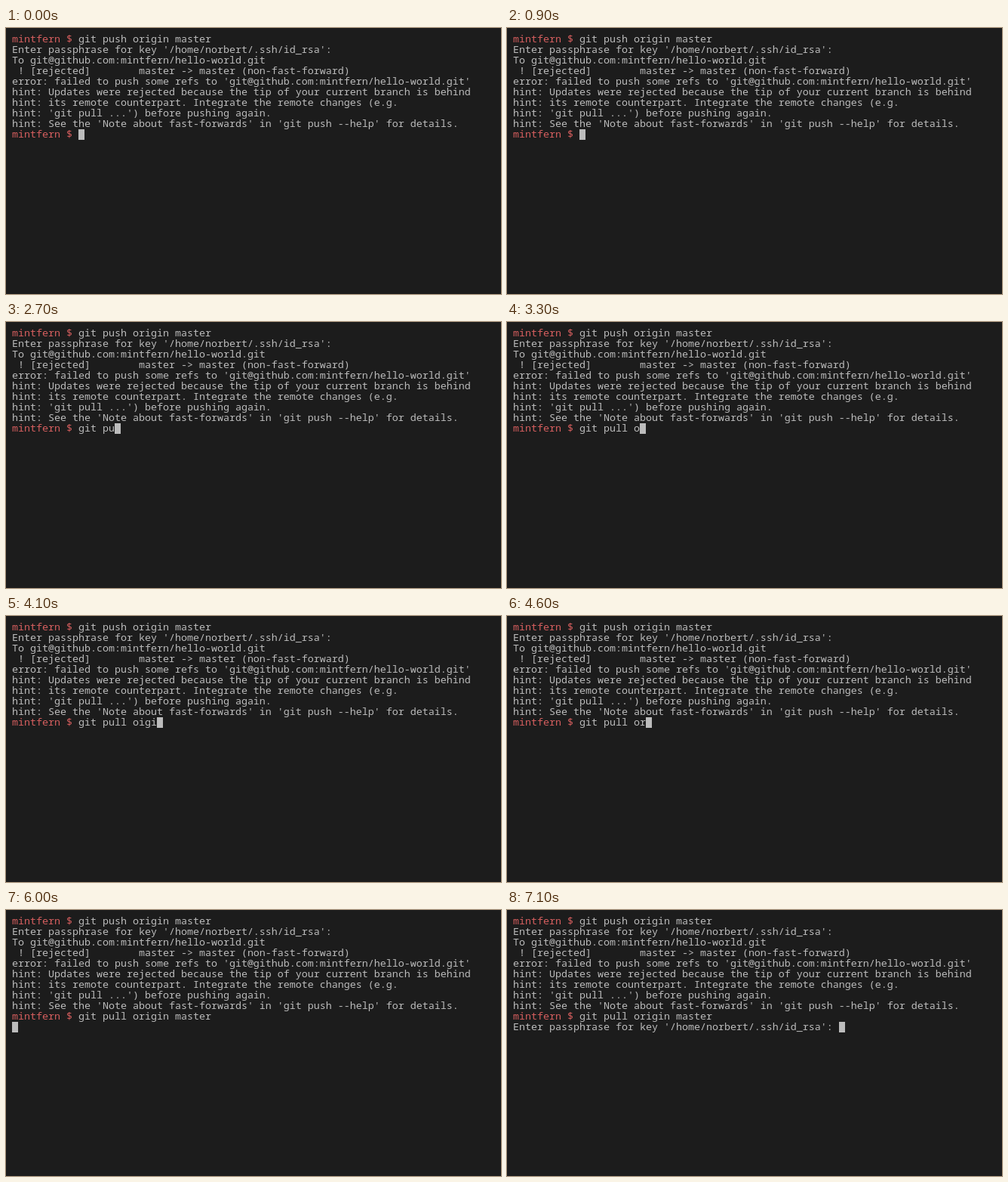
An HTML page for the animation above (8 s loop, 656 px wide and 352 px high).

```html
<!DOCTYPE html>
<html lang="en">
<head>
<meta charset="utf-8">
<title>Terminal</title>
<style>
  html, body { margin: 0; width: 100%; height: 100%; overflow: hidden; background: #1c1c1c; }
  #screen {
    position: absolute; left: 8px; top: 7px; margin: 0;
    font: 300 13.3333px/14px "Noto Sans Mono", "Liberation Mono", monospace;
    font-variant-ligatures: none;
    color: #bcbcbc; white-space: pre;
  }
  .prompt { color: #d75f5f; }
  #cursor { position: absolute; left: 8px; top: 8px; width: 8px; height: 14px; background: #bcbcbc; }
</style>
</head>
<body>
<pre id="screen"><span class="prompt">mintfern $</span> git push origin master
Enter passphrase for key '/home/norbert/.ssh/id_rsa':
To git@github.com:mintfern/hello-world.git
 ! [rejected]        master -&gt; master (non-fast-forward)
error: failed to push some refs to 'git@github.com:mintfern/hello-world.git'
hint: Updates were rejected because the tip of your current branch is behind
hint: its remote counterpart. Integrate the remote changes (e.g.
hint: 'git pull ...') before pushing again.
hint: See the 'Note about fast-forwards' in 'git push --help' for details.
<span class="prompt">mintfern $</span> <span id="typed"></span></pre>
<div id="cursor"></div>
<script>
  const LOOP = 8000, CELL = 8, LINE = 14, PROMPT_COLS = 11, PROMPT_ROW = 9;
  const PASSPHRASE = "Enter passphrase for key '/home/norbert/.ssh/id_rsa': ";

  // [time in ms, keys]; "<" is backspace, "\n" is enter
  const keys = [
    [2000, "g"], [2100, "i"], [2200, "t"], [2300, " "],
    [2700, "pu"], [2900, "l"], [3100, "l"], [3200, " "], [3300, "o"],
    [3500, "i"], [3600, "g"], [3700, "i"], [3800, "n"],
    [4100, "<"], [4200, "<"], [4300, "<"], [4500, "<"], [4600, "r"],
    [4800, "i"], [4900, "g"], [5000, "i"], [5100, "n"], [5200, " "],
    [5300, "ma"], [5400, "s"], [5500, "t"], [5700, "e"], [5800, "r"],
    [6000, "\n"], [6400, PASSPHRASE]
  ];

  const typed = document.getElementById("typed");
  const cursor = document.getElementById("cursor");

  function textAt(time) {
    let text = "";
    for (const [at, input] of keys) {
      if (at > time) break;
      text = input === "<" ? text.slice(0, -1) : text + input;
    }
    return text;
  }

  function draw(now) {
    const text = textAt(now % LOOP);
    if (typed.textContent !== text) typed.textContent = text;
    const lines = text.split("\n");
    const row = PROMPT_ROW + lines.length - 1;
    const col = lines[lines.length - 1].length + (lines.length === 1 ? PROMPT_COLS : 0);
    cursor.style.transform = `translate(${col * CELL}px, ${row * LINE}px)`;
    requestAnimationFrame(draw);
  }

  draw(performance.now());
</script>
</body>
</html>
```
